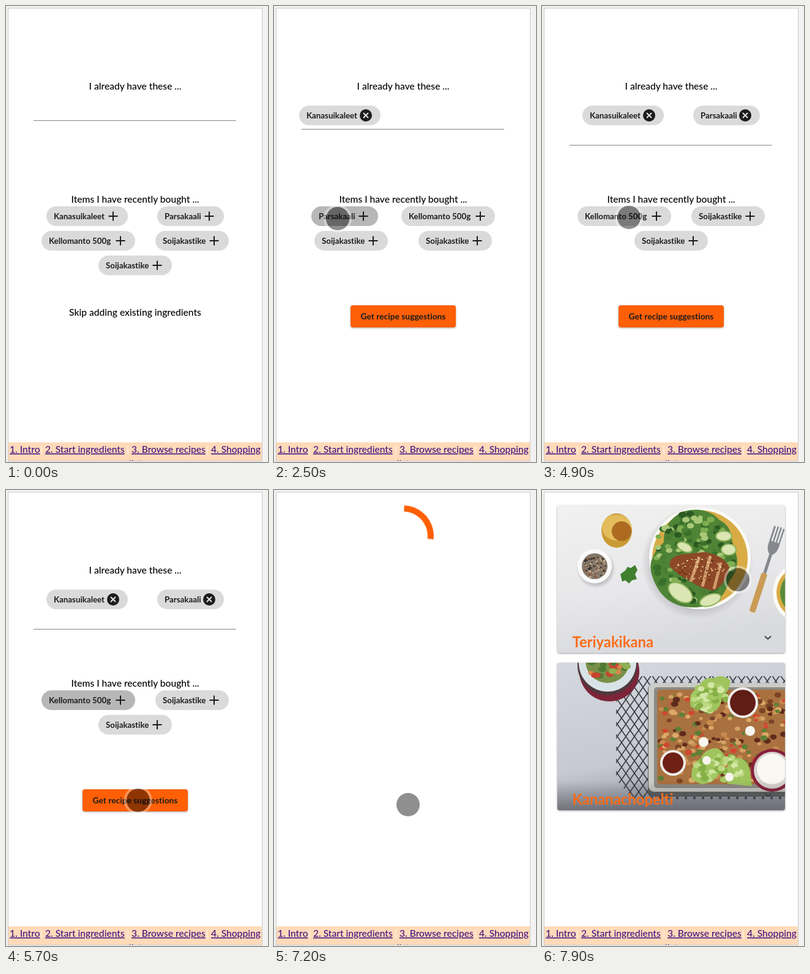
These frames come from a looping animation (428x742 px, 8000 ms). An HTML page:

```html
<!DOCTYPE html>
<html lang="en">
<head>
<meta charset="utf-8">
<title>Ingredient picker</title>
<style>
html, body { margin: 0; width: 100%; height: 100%; overflow: hidden; background: #f2f2f2; }
svg { display: block; width: 428px; height: 742px; }
text { font: 500 15.6px Lato, "Open Sans", sans-serif; fill: #000; font-variant-ligatures: none; }
.mid { text-anchor: middle; }
.chip text { font-size: 13.3px; font-weight: 700; fill: #1c1c1c; }
.chip path { fill: none; stroke: #1c1c1c; stroke-width: 2; }
.chip .x { stroke: #e4e4e4; }
.btn text { font-size: 13.8px; font-weight: 700; fill: #1c1c1c; }
.btn rect { fill: #ff5f05; filter: drop-shadow(0 1.5px 1.5px rgba(0,0,0,.35)); }
.rule { stroke: #868686; }
.link { fill: #451280; text-decoration: underline; }
.bar { fill: #fff; opacity: .75; }
.title { font-size: 23.8px; font-weight: 700; fill: #fb6c18; }
.card { filter: drop-shadow(0 1.5px 1.5px rgba(0,0,0,.4)); }

.scene { visibility: hidden; animation: 8s step-end infinite; }
#first { animation-name: first; }
#second { animation-name: second; }
#third { animation-name: third; }
#loading { animation-name: loading; }
#recipes { animation-name: recipes; }
@keyframes first { 0% { visibility: visible } 26.875%, 100% { visibility: hidden } }
@keyframes second { 0% { visibility: hidden } 26.875% { visibility: visible } 59.75%, 100% { visibility: hidden } }
@keyframes third { 0% { visibility: hidden } 59.75% { visibility: visible } 78.25%, 100% { visibility: hidden } }
@keyframes loading { 0% { visibility: hidden } 78.25% { visibility: visible } 91.875%, 100% { visibility: hidden } }
@keyframes recipes { 0% { visibility: hidden } 91.875%, 100% { visibility: visible } }

.focus { opacity: 0; animation: 8s linear infinite; }
#second .focus { animation-name: focusA; }
#third .focus { animation-name: focusB; }
@keyframes focusA { 0%, 27% { opacity: 0 } 29.5%, 100% { opacity: .16 } }
@keyframes focusB { 0%, 62% { opacity: 0 } 64.5%, 100% { opacity: .16 } }

#spin { transform-origin: 211px 75px; animation: spin 8s linear infinite; }
#arc { fill: none; stroke: #ff5f05; stroke-width: 10; animation: arc 8s cubic-bezier(.35,0,.25,1) infinite; }
@keyframes spin { 0%, 78.34% { transform: rotate(0deg) } 91.875%, 100% { transform: rotate(195deg) } }
@keyframes arc {
  0%, 80.83% { stroke-dasharray: 18 360; stroke-dashoffset: 0 }
  87.08% { stroke-dasharray: 288 360; stroke-dashoffset: 0 }
  93.33%, 100% { stroke-dasharray: 18 360; stroke-dashoffset: -270 }
}

#arrow { animation: arrowMove 8s ease-out infinite, arrowShow 8s step-end infinite; }
@keyframes arrowMove { 0%, 13% { transform: translate(170px, 744px) } 19.5%, 100% { transform: translate(104px, 348px) } }
@keyframes arrowShow { 0% { visibility: hidden } 13% { visibility: visible } 23.2%, 100% { visibility: hidden } }
#touch { animation: touchMove 8s ease-in-out infinite, touchShow 8s step-end infinite; }
@keyframes touchMove {
  0%, 33% { transform: translate(104px, 346px) }
  43%, 45.1% { transform: translate(266px, 339px) }
  46.2%, 48% { transform: translate(266px, 338px) }
  56.5%, 64% { transform: translate(142px, 344px) }
  72.5%, 93% { transform: translate(219px, 512px) }
  98%, 100% { transform: translate(320px, 146px) }
}
@keyframes touchShow { 0% { visibility: hidden } 23.2%, 100% { visibility: visible } }
</style>
</head>
<body>
<svg viewBox="0 0 428 742">
  <defs>
    <clipPath id="screen"><rect x="4" y="4" width="414" height="736"/></clipPath>
    <clipPath id="frame"><rect width="372" height="240" rx="4"/></clipPath>
    <linearGradient id="linen" x2=".25" y2="1">
      <stop stop-color="#f1f1f0"/><stop offset=".6" stop-color="#e8e8ea"/><stop offset="1" stop-color="#d9dadd"/>
    </linearGradient>
    <linearGradient id="slate" x2=".3" y2="1">
      <stop stop-color="#d5d8df"/><stop offset=".7" stop-color="#c6c9d1"/><stop offset="1" stop-color="#9b9ea6"/>
    </linearGradient>
    <linearGradient id="dusk" x2="0" y2="1">
      <stop offset=".8" stop-color="#303238" stop-opacity="0"/><stop offset="1" stop-color="#303238" stop-opacity=".45"/>
    </linearGradient>
    <radialGradient id="shade">
      <stop offset=".7" stop-color="#8d8f96" stop-opacity=".6"/><stop offset="1" stop-color="#8d8f96" stop-opacity="0"/>
    </radialGradient>
    <pattern id="mesh" width="14" height="20" patternUnits="userSpaceOnUse">
      <path d="M0 0L14 20M14 0L0 20" stroke="#3b3e45" stroke-width="1.700"/>
    </pattern>
  </defs>

  <rect width="428" height="742" fill="#f2f2f2"/>
  <rect x="3.5" y="3.5" width="415" height="737" fill="#fff" stroke="#cbcbcb"/>

  <g clip-path="url(#screen)">
    <g class="scene" id="first"></g>
    <g class="scene" id="second"></g>
    <g class="scene" id="third"></g>

    <g class="scene" id="loading">
      <g id="spin"><circle id="arc" cx="211" cy="75" r="45" pathLength="360" transform="rotate(-90 211 75)"/></g>
    </g>

    <g class="scene" id="recipes">
      <g class="card" transform="translate(25 25)"><g clip-path="url(#frame)">
        <rect width="372" height="240" fill="url(#linen)"/>
        <ellipse cx="97" cy="41" rx="25" ry="28" fill="#c99a35"/>
        <ellipse cx="97" cy="36" rx="24" ry="21" fill="#e3bd5c"/>
        <circle cx="105" cy="42" r="16" fill="#ad6a20"/>
        <circle cx="63" cy="103" r="32" fill="url(#shade)"/>
        <circle cx="61" cy="99" r="28" fill="#fafafa"/>
        <circle cx="61" cy="99" r="21" fill="#85776a"/>
        <g id="seeds"></g>
        <path d="M103 112l8-6 4-6 5 2 7-5 4 8-4 7 3 8-8 2-5 5-6-5-5 2z" fill="#40802f"/>
        <circle cx="229" cy="93" r="92" fill="url(#shade)"/>
        <circle cx="233" cy="86" r="83" fill="#fbfaf5"/>
        <circle cx="233" cy="86" r="78" fill="#d8ab45"/>
        <path d="M154 112q-8-26 20-52-2-33 31-50 38-10 60 14 20 8 21 39 18 35-5 60-12 42-55 43-55 2-72-54z" fill="#4f8436"/>
        <g id="salad"></g>
        <g fill="#dbe6b4" stroke="#8fb45c" stroke-width="2">
          <ellipse cx="201" cy="142" rx="22" ry="13" transform="rotate(35 201 142)"/>
          <ellipse cx="250" cy="154" rx="18" ry="9" transform="rotate(-20 250 154)"/>
          <ellipse cx="272" cy="50" rx="13" ry="8"/>
          <ellipse cx="280" cy="72" rx="12" ry="9"/>
          <ellipse cx="208" cy="68" rx="13" ry="7" transform="rotate(25 208 68)"/>
        </g>
        <path d="M184 100Q181 84 203 80L240 76Q270 80 281 100 276 130 254 139 240 136 228 130L199 113Z" fill="#8c4827"/>
        <path d="M218 124l14-40M237 132l13-50M256 136l11-43" stroke="#d09a6a" stroke-width="5"/>
        <g id="sesame"></g>
        <g transform="translate(319 171) rotate(18)">
          <rect x="-5" y="-64" width="10" height="67" rx="4" fill="#c99b56"/>
          <path d="M-2.500-64V-96Q-9-101-9-112V-142H-6V-117H-3.500V-143H-1V-117H1.500V-143H4V-117H6.500V-142H9V-112Q9-101 2.500-96V-64Z" fill="#85898e"/>
        </g>
        <circle cx="402" cy="142" r="50" fill="#fbfaf5"/>
        <circle cx="402" cy="142" r="44" fill="#d8ab45"/>
        <circle cx="402" cy="142" r="38" fill="#5a8b38"/>
      </g></g>
      <text class="title" x="49.500" y="255.500">Teriyakikana</text>

      <g class="card" transform="translate(25 281)"><g clip-path="url(#frame)">
        <rect width="372" height="240" fill="url(#slate)"/>
        <path d="M120 22H372V222H124L96 190V62Z" fill="url(#mesh)"/>
        <circle cx="85" cy="14" r="49" fill="#7d2439"/>
        <circle cx="82" cy="4" r="49" fill="#50373d"/>
        <circle cx="82" cy="0" r="47" fill="#d8e3e8"/>
        <circle cx="82" cy="-3" r="36" fill="#789047"/>
        <g id="side"></g>
        <rect x="148" y="34" width="240" height="184" rx="9" fill="#5f6061"/>
        <rect x="149" y="33" width="240" height="177" rx="9" fill="#cbcbc7"/>
        <rect x="158" y="40" width="233" height="164" rx="5" fill="#8d8a84"/>
        <rect x="163" y="44" width="230" height="154" rx="5" fill="#a9713f"/>
        <g id="tray"></g>
        <g fill="#9fc45d">
          <path d="M218 72q-5-26 13-30 4-19 25-17 12-8 27 4-2 18-14 28-3 24-23 25z"/>
          <path d="M220 190q-4-25 14-34 8-17 27-17 17 8 10 27-8 30-36 32z"/>
          <path d="M278 197q-8-25 9-42 20-3 27 17l4 29z"/>
        </g>
        <g id="lettuce"></g>
        <g id="lettuce2"></g>
        <g fill="#f7f5ef"><circle cx="239" cy="129" r="8"/><circle cx="244" cy="159" r="7"/><circle cx="315" cy="111" r="8"/><circle cx="281" cy="186" r="7"/></g>
        <circle cx="303" cy="65" r="25" fill="#f1efec"/><circle cx="303" cy="65" r="21" fill="#601d15"/>
        <circle cx="189" cy="163" r="21" fill="#f1efec"/><circle cx="189" cy="163" r="17" fill="#6e2015"/>
        <circle cx="351" cy="175" r="35" fill="#872139"/><circle cx="351" cy="175" r="30" fill="#d7d3ce"/><circle cx="351" cy="173" r="25" fill="#faf8f3"/>
        <rect width="372" height="240" fill="url(#dusk)"/>
      </g></g>
      <text class="title" x="49.500" y="511.500">Kananachopelti</text>
      <path d="M364 238l5 4.500 5-4.500M364 494l5 4.500 5-4.500" fill="none" stroke="#3d3d3d" stroke-width="2"/>
    </g>

    <rect x="4" y="710" width="414" height="30" fill="#ffdab9"/>
    <text class="link" x="6" y="727">1. Intro</text>
    <text class="bar" x="56" y="727">|</text>
    <text class="link" x="64" y="727">2. Start ingredients</text>
    <text class="bar" x="197" y="727">|</text>
    <text class="link" x="205" y="727">3. Browse recipes</text>
    <text class="bar" x="327" y="727">|</text>
    <text class="link" x="335" y="727">4. Shopping</text>
    <text class="link mid" x="211" y="750">list</text>

    <g id="arrow">
      <path d="M0 0V28L6.500 22 11 33 15.500 31 11 20.500H19.500Z" stroke="#fff" stroke-width="3" paint-order="stroke"
        style="filter:drop-shadow(0 2px 1.500px rgba(0,0,0,.35))"/>
    </g>
    <g id="touch">
      <circle r="21" fill="none" stroke="#fff" stroke-opacity=".35" stroke-width="4"/>
      <circle r="19" fill-opacity=".44"/>
    </g>
  </g>
</svg>
<script>
const $ = id => document.getElementById(id);
const items = {
  kana: ['Kanasuikaleet', 133],
  parsa: ['Parsakaali', 109],
  juusto: ['Kellomanto 500g', 153],
  soija: ['Soijakastike', 120]
};

function chip(key, x, y, kind = 'add') {
  const [name, w] = items[key];
  const icon = kind === 'remove'
    ? `<circle cx="${w - 24}" cy="16" r="10" fill="#1c1c1c"/><path class="x" d="M${w - 28} 12l8 8m0-8l-8 8"/>`
    : `<path d="M${w - 31.5} 16h15m-7.500-7.500v15"/>`;
  const shade = kind === 'focus' ? `<rect class="focus" width="${w}" height="32" rx="16"/>` : '';
  return `<g class="chip" transform="translate(${x} ${y})"><rect width="${w}" height="32" rx="16" fill="#dadada"/>${shade}
    <text x="12" y="20.500">${name}</text>${icon}</g>`;
}

const label = (s, y) => `<text class="mid" x="211" y="${y}">${s}</text>`;
const button = `<g class="btn"><rect x="125" y="487" width="172" height="36" rx="4"/>
  <text class="mid" x="211" y="510">Get recipe suggestions</text></g>`;

function page(id, rule, action, chips) {
  $(id).innerHTML = label('I already have these ...', 136) +
    `<path class="rule" d="M45 ${rule}.5H376"/>` +
    label('Items I have recently bought ...', 320) +
    chips.map(c => chip(...c)).join('') + action;
}

page('first', 186, label('Skip adding existing ingredients', 504), [
  ['kana', 66, 326], ['parsa', 247, 326], ['juusto', 58, 366], ['soija', 244, 366], ['soija', 151, 406]
]);
page('second', 200, button, [
  ['kana', 41, 162, 'remove'],
  ['parsa', 61, 326, 'focus'], ['juusto', 208, 326], ['soija', 66, 366], ['soija', 236, 366]
]);
page('third', 226, button, [
  ['kana', 66, 162, 'remove'], ['parsa', 247, 162, 'remove'],
  ['juusto', 58, 326, 'focus'], ['soija', 244, 326], ['soija', 151, 366]
]);

let seed = 7;
const rnd = () => (seed = seed * 16807 % 2147483647) / 2147483647;

// Sprinkles n dots over an ellipse, or over a box when box is set.
function scatter(id, n, cx, cy, rx, ry, size, colors, box) {
  let out = '';
  for (let i = 0; i < n; i++) {
    const a = rnd() * 2 * Math.PI, d = Math.sqrt(rnd());
    const x = cx + rx * (box ? rnd() * 2 - 1 : d * Math.cos(a));
    const y = cy + ry * (box ? rnd() * 2 - 1 : d * Math.sin(a));
    const r = size * (.6 + .6 * rnd());
    out += `<ellipse cx="${x.toFixed(1)}" cy="${y.toFixed(1)}" rx="${r.toFixed(1)}" ry="${(r * .75).toFixed(1)}" fill="${colors[i % colors.length]}"/>`;
  }
  $(id).innerHTML = out;
}
const leaves = ['#bcd983', '#86b047', '#d3e6a4', '#a5c964'];
scatter('seeds', 90, 61, 99, 19, 19, 1.6, ['#2f2925', '#c9b494', '#8a5a3c']);
scatter('salad', 150, 222, 86, 66, 74, 6, ['#2c5a22', '#7fae52', '#487d33', '#a9c878', '#38702b']);
scatter('sesame', 80, 233, 103, 40, 20, 1.4, ['#efdcb4', '#5c2a16', '#e2c08c']);
scatter('side', 36, 82, 4, 32, 24, 6, ['#c9432f', '#8fb052', '#d9854a', '#4f7a35']);
scatter('tray', 260, 272, 121, 104, 72, 5, ['#c78a4e', '#7c4426', '#d0472f', '#d3a264', '#5f7f35', '#dca968', '#5f2a1c'], true);
scatter('lettuce', 40, 250, 56, 28, 25, 6, leaves);
scatter('lettuce2', 50, 268, 172, 42, 22, 6, leaves);
</script>
</body>
</html>
```
